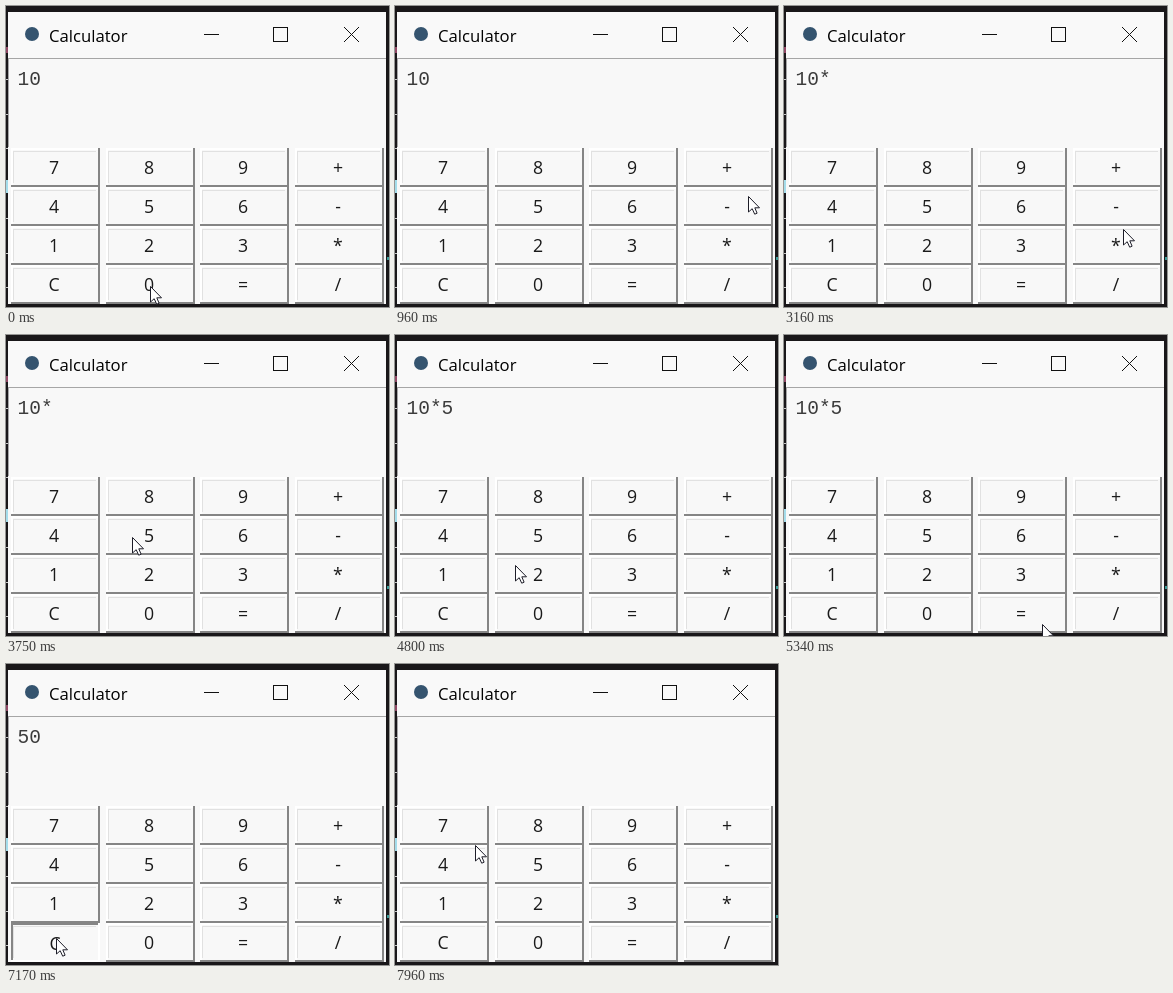
Write an HTML page with a canvas that moves like this. It is 383 by 301 pixels and loops after 8000 ms.

```html
<!DOCTYPE html>
<html lang="en">
<head>
<meta charset="utf-8">
<title>Calculator</title>
<style>
  html, body { margin: 0; width: 100%; height: 100%; overflow: hidden; background: #191719; }
  canvas { display: block; }
</style>
</head>
<body>
<canvas id="stage" width="383" height="301"></canvas>
<script>
const ctx = document.getElementById('stage').getContext('2d');
const LOOP = 8000;
const UI_FONT = '"Open Sans", "Noto Sans", sans-serif';
const MONO_FONT = '"Liberation Mono", "Courier New", monospace';
const DARK = '#191719', FACE = '#f8f8f8', SHADE = '#858585', SOFT = '#e1e1e1';

const rows = ['789+', '456-', '123*', 'C0=/'];

// The pointer follows a Bezier curve (two handles and an end) in discrete steps.
const start = [144, 280];
const moves = [
  { from: 240, to: 949, steps: 11, curve: [[230, 225], [400, 125], [353, 190]] },
  { from: 1020, to: 1530, steps: 9, curve: [[345, 165], [348, 150], [354, 160]] },
  { from: 1870, to: 2260, steps: 7, curve: [[354, 175], [347, 220], [347, 238]] },
  { from: 3160, to: 3750, steps: 8, curve: [[290, 120], [130, 70], [126, 202]] },
  { from: 4640, to: 5340, steps: 10, curve: [[104, 246], [140, 290], [258, 289]] },
  { from: 6350, to: 6870, steps: 8, curve: [[250, 285], [60, 268], [50, 274]] },
  { from: 7840, to: 7960, steps: 3, curve: [[52, 255], [70, 215], [80, 181]] }
];
const clicks = [
  { key: '*', down: 2440, up: 2700, shows: '10*' },
  { key: '5', down: 4090, up: 4270, shows: '10*5' },
  { key: '=', down: 5560, up: 5740, shows: '50' },
  { key: 'C', down: 7170, up: 7350, shows: '' }
];

function rect(x, y, w, h, color) {
  ctx.fillStyle = color;
  ctx.fillRect(x, y, w, h);
}

function label(str, x, y, font, color, align = 'left') {
  ctx.font = font;
  ctx.textAlign = align;
  ctx.fillStyle = color;
  ctx.fillText(str, x, y);
}

function stroke(...lines) {
  ctx.beginPath();
  for (const [x1, y1, x2, y2] of lines) {
    ctx.moveTo(x1, y1);
    ctx.lineTo(x2, y2);
  }
  ctx.stroke();
}

function drawWindow() {
  rect(0, 0, 383, 301, DARK);
  for (let y = 73; y < 300; y += 34.7) rect(0, Math.round(y), 2, 1, '#c8c8c8');
  rect(0, 41, 2, 6, '#8f4763');
  rect(0, 174, 2, 13, '#a4dcea');
  rect(381, 251, 2, 3, '#3c9c98');

  rect(2, 6, 378, 292, FACE);
  rect(2, 6, 378, 46, '#f9f9f9');
  rect(2, 52, 378, 1, '#a6a6a6');
  rect(2, 53, 1, 88, '#a6a6a6');

  ctx.fillStyle = '#35546f';
  ctx.beginPath();
  ctx.arc(26, 28, 7, 0, Math.PI * 2);
  ctx.fill();
  label('Calculator', 43, 36, `16.7px ${UI_FONT}`, '#000');

  ctx.strokeStyle = '#111';
  ctx.lineWidth = 1;
  stroke([198, 28.5, 213, 28.5]);
  ctx.strokeRect(267.5, 21.5, 14, 14);
  stroke([338, 21, 353, 36], [353, 21, 338, 36]);
}

function drawButton(key, x, y, down) {
  const w = 89, h = 39;
  const shift = down ? 1 : 0;
  const [lit, unlit] = down ? [SHADE, '#fff'] : ['#fff', SHADE];
  rect(x + 1, y + 1, w, 2, lit);
  rect(x + 1, y + 1, 2, h, lit);
  rect(x + 3, y + 4, w - 6, 1, SOFT);
  rect(x + 3, y + 4, 1, h - 7, SOFT);
  rect(x + 1, y + h - 1, w, 2, unlit);
  rect(x + w - 1, y + 1, 2, h, unlit);
  label(key, x + 44 + shift, y + 27 + shift, `500 17.7px ${UI_FONT}`, '#1a1a1a', 'center');
}

function drawCursor([x, y]) {
  const shape = [[0, 0], [0, 15.5], [3.7, 12.2], [6.2, 17.7], [8.6, 16.7], [6.3, 11.3], [11, 11.3]];
  ctx.beginPath();
  for (const [dx, dy] of shape) ctx.lineTo(x + dx + 0.5, y + dy + 0.5);
  ctx.closePath();
  ctx.fillStyle = '#fff';
  ctx.fill();
  ctx.strokeStyle = '#1d1d28';
  ctx.lineWidth = 1;
  ctx.stroke();
}

const ease = u => u * u * (3 - 2 * u);

function bezier(a, [b, c, d], u) {
  const v = 1 - u;
  return a.map((p, i) => Math.round(
    v * v * v * p + 3 * v * v * u * b[i] + 3 * v * u * u * c[i] + u * u * u * d[i]));
}

function cursorAt(t) {
  let pos = start;
  for (const { from, to, steps, curve } of moves) {
    if (t < from) break;
    const step = 1 + Math.floor((t - from) / (to - from) * (steps - 1) + 1e-6);
    pos = bezier(pos, curve, ease(Math.min(1, step / steps)));
  }
  return pos;
}

function draw(t) {
  drawWindow();
  const done = clicks.filter(c => t >= c.up).pop();
  label(done ? done.shows : '10', 11.5, 78.5, `19.5px ${MONO_FONT}`, '#3c3c3c');

  const held = clicks.find(c => t >= c.down && t < c.up);
  rows.forEach((row, r) => [...row].forEach((key, c) => {
    drawButton(key, Math.round(4 + c * 94.7), 141 + r * 39, held && held.key === key);
  }));
  rect(0, 298, 383, 3, DARK);
  drawCursor(cursorAt(t));
}

const began = performance.now();
function tick() {
  draw((performance.now() - began) % LOOP);
  requestAnimationFrame(tick);
}
tick();
</script>
</body>
</html>
```
